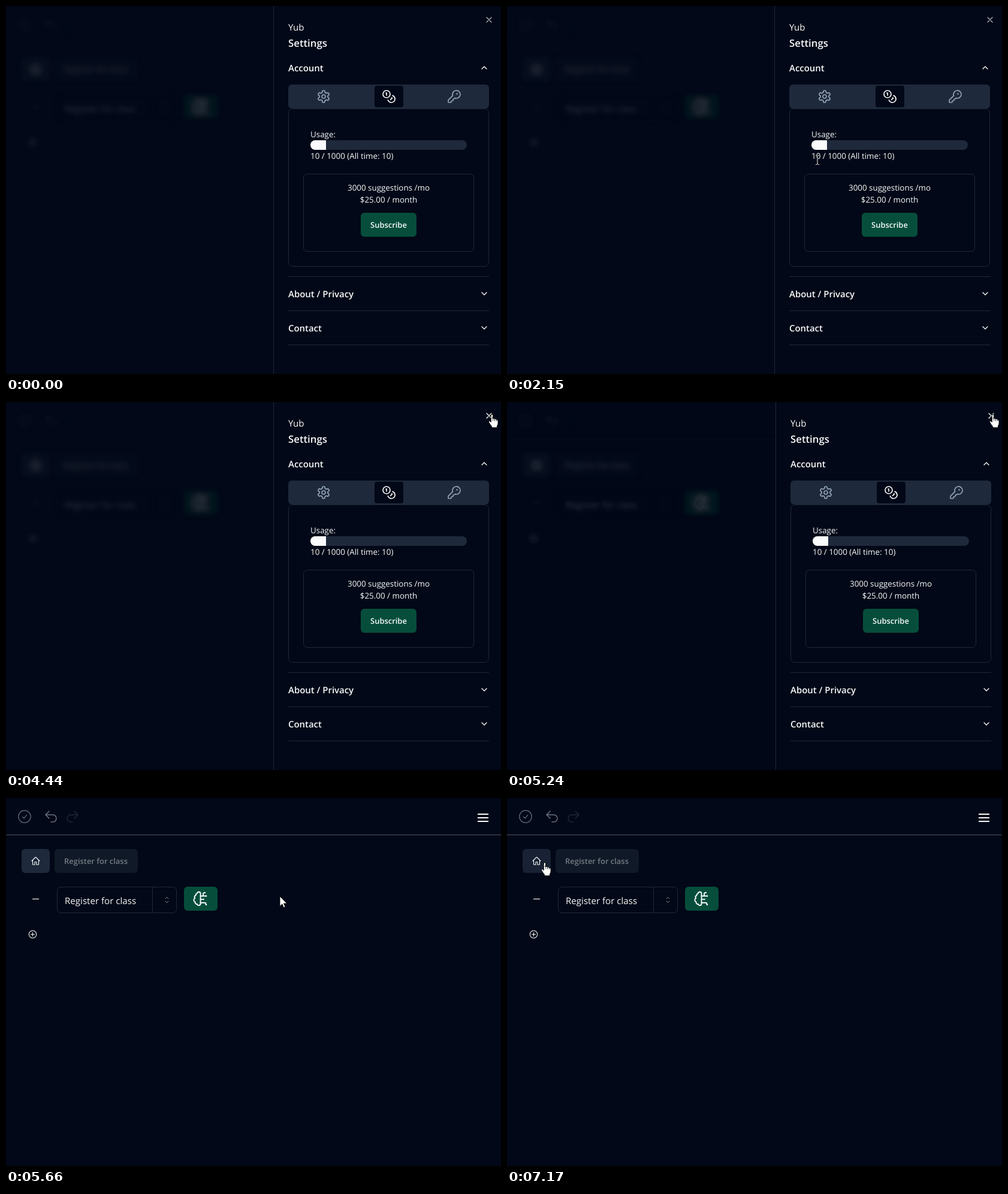
Recreate the animation shown at these times as an HTML page. Size 826 px wide and 614 px high, loop 8 s.

```html
<!DOCTYPE html>
<html lang="en">
<head>
<meta charset="utf-8">
<title>Settings panel</title>
<style>
  html, body { margin: 0; width: 100%; height: 100%; overflow: hidden; background: #020817; }
  svg { display: block; width: 100%; height: 100%; }
  text { font-family: "Open Sans", "Noto Sans", sans-serif; fill: #f8fafc; text-rendering: geometricPrecision; }
  .h { font-size: 14.95px; font-weight: 600; }
  .s { font-size: 13.4px; }
  .b { font-size: 12.95px; font-weight: 600; }
  .mid { text-anchor: middle; }
  .i { fill: none; stroke: #f8fafc; stroke-linecap: round; stroke-linejoin: round; }
  .line { fill: none; stroke: #1e293b; }
  .on { text-decoration: underline; }
</style>
</head>
<body>
<svg viewBox="0 0 826 614">
  <defs>
    <filter id="blur"><feGaussianBlur stdDeviation="4"/></filter>
    <clipPath id="bar"><rect x="508" y="224" width="261" height="16" rx="8"/></clipPath>
    <path id="back" d="M-3 3-9-3l6-6M-9-3H3a6 6 0 0 1 0 12H0"/>
    <path id="tooth" d="M-2.22-7.82V-8a2 2 0 0 1 2-2h.44a2 2 0 0 1 2 2v.18a2 2 0 0 0 1 1.73l.43.25a2 2 0 0 0 2 0l.15-.08"/>
    <path id="chev" d="M-4-2 0 2 4-2"/>
  </defs>
  <rect width="826" height="614" fill="#020817"/>

  <g id="page">
    <g class="i" stroke-width="1.5">
      <g style="stroke:#566070"><circle cx="31" cy="31" r="10.2"/><path d="M27.5 31.5 30 34l4.5-5.5"/></g>
      <use href="#back" x="75" y="31" style="stroke:#6b7280"/>
      <use href="#back" transform="translate(111 31) scale(-1 1)" style="stroke:#1f2735"/>
    </g>
    <path d="M0 61.5H826" stroke="#4b5563"/>
    <path class="i" stroke-width="2" style="stroke-linecap:butt" d="M787 27h18M787 33h18M787 39h18"/>

    <rect id="home" x="26" y="85" width="47" height="40" rx="6" fill="#1e293b"/>
    <path class="i" stroke-width="1.1" d="M43 105l6-6q.5-.5 1 0l6 6M44.5 103.5v7q0 .7.7.7H48V107.500q0-.7.7-.7h1.600q.7 0 .7.7v3.700h2.800q.7 0 .7-.7v-7"/>
    <rect x="81" y="85" width="139" height="40" rx="6" fill="#101927"/>
    <text class="b" x="97" y="110" style="fill:#747b85">Register for class</text>

    <path d="M44 168.500h11" stroke="#f8fafc" stroke-width="1.2"/>
    <rect class="line" x="85.5" y="148.500" width="199" height="43" rx="6"/>
    <path class="line" d="M244.500 149v42"/>
    <text x="98" y="177" font-size="15.1">Register for class</text>
    <path class="i" opacity=".55" d="M266 168l2.500-2.500 2.500 2.500M266 172l2.500 2.500 2.500-2.500"/>
    <rect x="297" y="148" width="56" height="40" rx="6" fill="#064e3b"/>
    <g class="i" stroke-width="1.7" transform="translate(325 168) scale(1.12) translate(-12.400 -12)">
      <path d="M12 4.500a2.500 2.500 0 0 0-4.960-.46 2.500 2.500 0 0 0-1.980 3 2.500 2.500 0 0 0-1.320 4.240 3 3 0 0 0 .34 5.580 2.500 2.500 0 0 0 2.960 3.080 2.500 2.500 0 0 0 4.910.05L12 20Z"/>
      <path d="M16 8V5q0-2 2-2M12 13h4M12 18h6a2 2 0 0 1 2 2v1M12 8h8"/>
      <path d="M18.500 3h.01M20.500 8h.01M16.500 13h.01M20.500 21h.01" stroke-width="2.200"/>
    </g>
    <g class="i" stroke-width="1.1"><circle cx="44.500" cy="227.500" r="6.200"/><path d="M41.500 227.500h6M44.500 224.500v6"/></g>
  </g>

  <g id="veil">
    <rect width="826" height="614" fill="#020817"/>
    <use href="#page" filter="url(#blur)" opacity=".2"/>
  </g>

  <g id="panel">
    <rect x="446" width="380" height="614" fill="#020817"/>
    <path class="line" d="M446.500 0V614"/>
    <text x="471" y="41" font-size="15">Yub</text>
    <text x="471" y="68" font-size="16.800" font-weight="600">Settings</text>
    <path id="close" class="i" stroke-width="1.330" d="M802 19l8 8M810 19l-8 8"/>

    <text id="account" class="h" x="471" y="109">Account</text>
    <g class="i" stroke-width="1.330">
      <use href="#chev" transform="translate(798 103) scale(1 -1)"/>
      <use href="#chev" x="798" y="480"/>
      <use href="#chev" x="798" y="537"/>
    </g>

    <rect x="471" y="131" width="335" height="40" rx="6" fill="#1e293b"/>
    <rect x="615" y="133" width="48" height="36" rx="4" fill="#020817"/>
    <g class="i" stroke-width="1.700">
      <g id="gear" transform="translate(530 151)" style="stroke:#94a3b8"><circle r="3"/></g>
      <g transform="translate(627 139)">
        <circle cx="8" cy="8" r="6"/>
        <path d="M18.090 10.370A6 6 0 1 1 10.340 18M7 6h1v4M16.710 13.880l.7.71-2.820 2.820"/>
      </g>
      <g transform="translate(736 139)" style="stroke:#94a3b8">
        <path d="M2.590 17.410A2 2 0 0 0 2 18.830V21a1 1 0 0 0 1 1h3a1 1 0 0 0 1-1v-1a1 1 0 0 1 1-1h1a1 1 0 0 0 1-1v-1a1 1 0 0 1 1-1h.17a2 2 0 0 0 1.410-.59l.81-.81a6.500 6.500 0 1 0-4-4z"/>
        <circle cx="16.500" cy="7.500" r=".5"/>
      </g>
    </g>

    <rect class="line" x="471.500" y="171.500" width="334" height="263" rx="7"/>
    <text class="s" x="508" y="219">Usage:</text>
    <g clip-path="url(#bar)">
      <rect x="508" y="224" width="261" height="16" fill="#1e293b"/>
      <rect x="508" y="224" width="26" height="16" fill="#f8fafc"/>
    </g>
    <text class="s" x="508" y="255">10 / 1000 (All time: 10)</text>

    <rect class="line" x="496.500" y="280.500" width="284" height="129" rx="6"/>
    <text class="s mid" x="638.500" y="308">3000 suggestions /mo</text>
    <text class="s mid" x="638.500" y="328">$25.00 / month</text>
    <rect id="buy" x="592" y="345" width="93" height="40" rx="6" fill="#064e3b"/>
    <text class="b mid" x="638.500" y="370">Subscribe</text>

    <path class="line" d="M471 451.500H806M471 508.500H806M471 565.500H806"/>
    <text id="about" class="h" x="471" y="486">About / Privacy</text>
    <text id="contact" class="h" x="471" y="543">Contact</text>
  </g>

  <g id="arrow" stroke="#000" stroke-width=".8"><path fill="#fff" d="M0 0V16.500L3.900 12.900 6.500 18.700 9 17.600 6.400 11.900H11.700Z"/></g>
  <g id="hand" stroke="#000" stroke-width=".8">
    <path fill="#fff" d="M-1.700 1.200Q-1.700-.5 0-.5T1.700 1.200V6.600Q4-.2 0 6.600M-1.700 1.200Q-1.700-.5 0-.5T1.700 1.200V6.500Q3.800 6 4.500 7.500 6.500 6.800 7.400 8.500 10 8.200 10 11V15Q10 17 8.300 19V21.700H-.3V20Q-2.500 17.500-5 13.300-6 11.300-4.500 10.700-3.300 10.500-1.700 12.700Z"/>
    <path fill="none" d="M1.700 6.500v4M4.500 7.500v3.300M7.400 8.500v2.600"/>
  </g>
  <path id="beam" fill="none" stroke="#fff" style="mix-blend-mode:difference" d="M-3-7.500H-1.500L0-6.500 1.500-7.500H3M0-6.500V6.500M-3 7.500H-1.500L0 6.500 1.500 7.500H3"/>
</svg>
<script>
const LOOP = 8000, STEP = 70, SHUT = 5226, WIDTH = 380;
const $ = id => document.getElementById(id);

// Pointer moves: start, steps, x, y
const moves = [
  [460, 1, 782, 584], [530, 10, 518.5, 248], [1550, 1, 517.5, 248],
  [2150, 1, 517.5, 257], [2220, 2, 520, 267], [2560, 5, 582, 257],
  [3120, 3, 738, 130], [3330, 9, 823, 20], [3960, 1, 823, 19],
  [4160, 5, 811, 21], [5380, 5, 457, 164], [5730, 2, 416, 191],
  [6200, 7, 107, 245], [6820, 6, 63, 108]
];

// Hot areas: x, y, width, height, pointer, hovered part
const panelAreas = [
  [798, 15, 16, 16, 'hand', 'close'],
  [471, 84, 335, 39, 'hand', 'account'],
  [471, 129, 335, 42, 'hand'],
  [508, 204, 261, 20, 'beam'],
  [508, 240, 261, 20, 'beam'],
  [513, 293, 251, 40, 'beam'],
  [592, 345, 93, 40, 'hand', 'buy'],
  [471, 452, 335, 56, 'hand', 'about'],
  [471, 509, 335, 56, 'hand', 'contact']
];
const pageAreas = [
  [26, 85, 47, 40, 'hand', 'home'],
  [86, 149, 158, 42, 'beam'],
  [297, 148, 56, 40, 'hand']
];

for (let a = 0; a < 360; a += 60) {
  $('gear').insertAdjacentHTML('beforeend', `<use href="#tooth" transform="rotate(${a})"/>`);
}

const clamp = v => Math.min(1, Math.max(0, v));

// cubic-bezier(.4, 0, .2, 1)
function ease(x) {
  let lo = 0, hi = 1, s;
  for (let i = 0; i < 20; i++) {
    s = (lo + hi) / 2;
    const at = 1.2 * (1 - s) ** 2 * s + .6 * (1 - s) * s * s + s ** 3;
    if (at < x) lo = s; else hi = s;
  }
  return 3 * (1 - s) * s * s + s ** 3;
}

function pointerAt(t) {
  let p = null;
  for (const [start, n, x, y] of moves) {
    if (t < start) break;
    const k = Math.min(n, Math.floor((t - start) / STEP) + 1);
    const u = 1 - (1 - k / n) ** 1.6;
    p = p ? { x: p.x + (x - p.x) * u, y: p.y + (y - p.y) * u } : { x, y };
  }
  return p;
}

function draw(t) {
  const tick = t - (t - 5170) % STEP;
  const shift = Math.round(WIDTH * ease(clamp((tick - SHUT) / 300)));
  $('panel').setAttribute('transform', `translate(${shift})`);
  $('panel').style.display = shift < WIDTH ? '' : 'none';
  $('veil').setAttribute('opacity', 1 - ease(clamp((tick - SHUT) / 150)));

  const p = pointerAt(t);
  const areas = t < 5380 ? panelAreas : pageAreas;
  const hit = p && areas.find(([x, y, w, h]) => p.x >= x && p.x < x + w && p.y >= y && p.y < y + h);
  const kind = hit ? hit[4] : 'arrow', part = hit && hit[5];
  for (const id of ['arrow', 'hand', 'beam']) {
    $(id).style.display = p && id === kind ? '' : 'none';
    if (p) $(id).setAttribute('transform', `translate(${Math.round(p.x)} ${Math.round(p.y)})`);
  }
  for (const id of ['account', 'about', 'contact']) $(id).classList.toggle('on', id === part);
  $('close').setAttribute('opacity', part === 'close' ? 1 : .7);
  $('buy').setAttribute('fill-opacity', part === 'buy' ? .9 : 1);
  $('home').setAttribute('fill-opacity', part === 'home' ? .8 : 1);
}

const begin = performance.now();
function frame() {
  draw((performance.now() - begin) % LOOP);
  requestAnimationFrame(frame);
}
frame();
</script>
</body>
</html>
```
